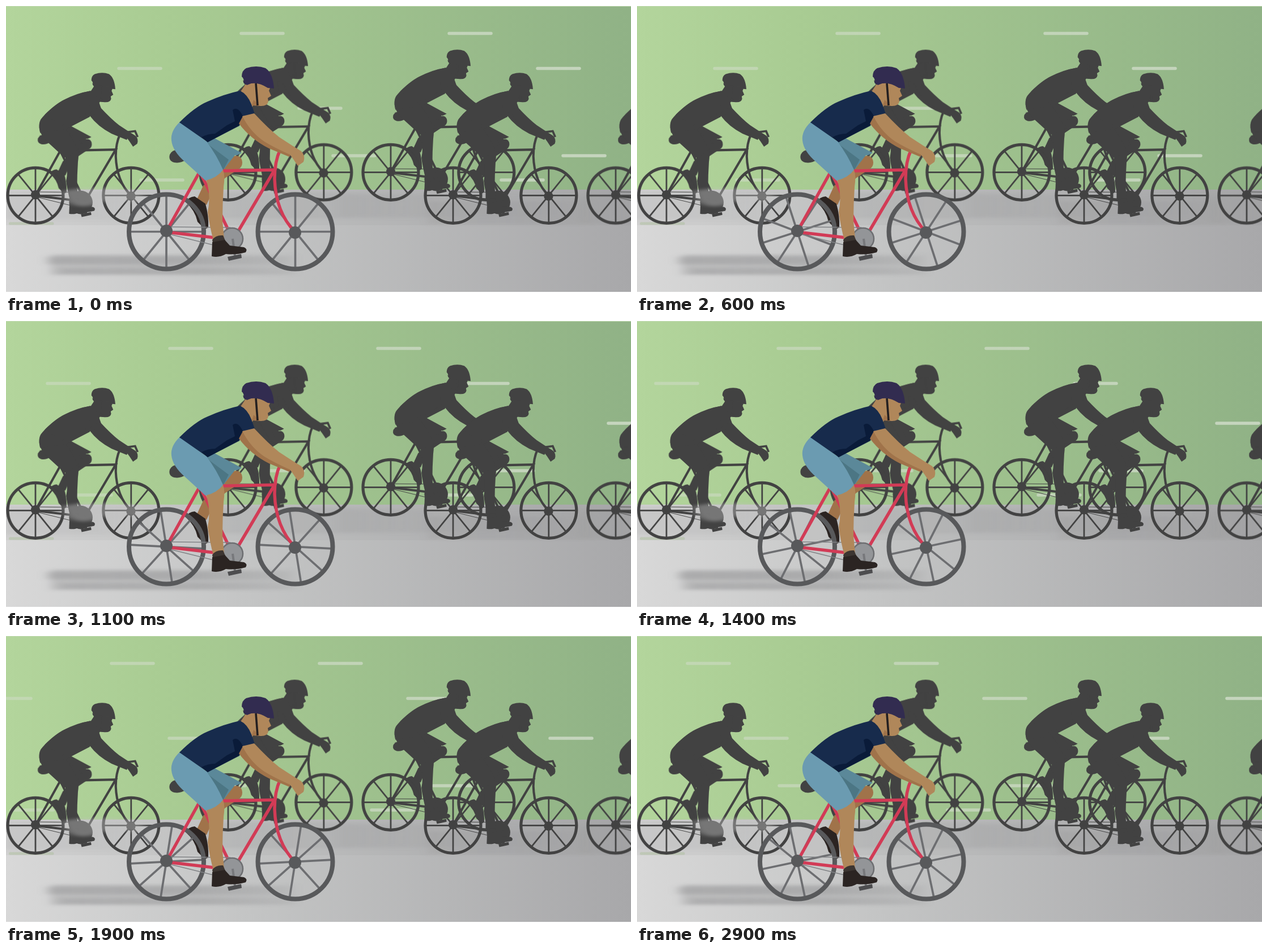
These frames come from a looping animation (1103 px wide and 508 px high, 3000 ms). An HTML page:

```html
<!DOCTYPE html>
<html lang="en">
<head>
<meta charset="utf-8">
<title>Cyclists</title>
<style>
html, body { margin: 0; width: 100%; height: 100%; overflow: hidden; background: #fff; }
svg { display: block; width: 1103px; height: 508px; }
</style>
</head>
<body>
<svg id="stage" viewBox="0 0 1103 508" fill="none">
  <defs>
    <linearGradient id="grass"><stop stop-color="#b3d59c"/><stop offset=".25" stop-color="#a9cc93"/><stop offset="1" stop-color="#90b286"/></linearGradient>
    <linearGradient id="road"><stop stop-color="#d8d8d8"/><stop offset=".4" stop-color="#c3c4c4"/><stop offset="1" stop-color="#a8a8aa"/></linearGradient>
    <linearGradient id="fade"><stop stop-color="#8c8c8e" stop-opacity=".75"/><stop offset=".6" stop-color="#8c8c8e" stop-opacity=".65"/><stop offset="1" stop-color="#8c8c8e" stop-opacity=".2"/></linearGradient>
    <linearGradient id="dash" gradientUnits="userSpaceOnUse" x1="0" y1="0" x2="1103" y2="0">
      <stop stop-color="#d5dccf" stop-opacity=".45"/><stop offset="1" stop-color="#dbe3d5" stop-opacity=".72"/>
    </linearGradient>
    <filter id="soft" x="-20%" y="-60%" width="140%" height="220%"><feGaussianBlur stdDeviation="8 2.5"/></filter>
  </defs>
  <rect width="1103" height="325" fill="url(#grass)"/>
  <path d="M0 .5H1103" stroke="#c3dcb3"/>
  <rect y="325" width="1103" height="181" fill="url(#road)"/>
  <rect y="325" width="1103" height="63" fill="#8c8c8e" opacity=".1"/>
  <path id="dashes" stroke="url(#dash)" stroke-width="5.5" stroke-linecap="round"/>
  <path d="M7.500 385H82" stroke="#a9bd98" stroke-opacity=".45" stroke-width="5" stroke-linecap="round"/>
  <g id="shadows" filter="url(#soft)"></g>
  <g id="pack"></g>
  <path d="M98 328Q150 316 245 328L240 350Q190 338 160 350Q130 362 106 345Z" fill="#c4c4c4" opacity=".4" filter="url(#soft)"/>
  <g id="leader"></g>
</svg>
<script>
const $ = id => document.getElementById(id);
const DARK = "#424242";

// [x, y, width, height, opacity]
$("shadows").innerHTML = [
  [-10, 328, 270, 50, .14], [350, 330, 410, 46, .22], [590, 335, 420, 38, .14], [745, 346, 290, 40, .25],
  [1010, 336, 110, 48, .18], [80, 440, 430, 36, .45], [72, 444, 430, 13, .45], [95, 464, 410, 11, .35]
].map(([x, y, w, h, o]) =>
  `<rect x="${x}" y="${y}" width="${w}" height="${h}" fill="url(#fade)" opacity="${o}"/>`).join("");

function rider(flat) {
  const ink = c => flat ? DARK : c;
  const fill = (c, d) => `<path d="${d}" fill="${ink(c)}"/>`;
  const line = (c, w, d) => `<path d="${d}" stroke="${ink(c)}" stroke-width="${w}"/>`;
  const wheel = (x, y) => {
    const spokes = [0, 51, 90, 129].map(a => `<path d="M-65 0H65" transform="rotate(${a})"/>`).join("");
    return `<g transform="translate(${x} ${y})">
      <g class="spokes" stroke="${ink("#6d6e71")}" stroke-width="3.700">${spokes}</g>
      <circle r="66" stroke="${ink("#58595b")}" stroke-width="${flat ? 7 : 8}"/></g>`;
  };
  const hub = (x, y) => `<circle cx="${x}" cy="${y}" r="11" fill="${ink("#58595b")}"/>`;
  const red = "#d23b56", skin = "#b0875a", shade = "#a0734a", shoe = "#2b2422";
  return [
    // far leg
    fill(DARK, "M289 263Q294 252 312 255L318 272Q308 279 297 277Q286 274 289 263Z"),
    fill(shade, "M378 296L400 266Q416 262 417 277Q417 285 410 289L386 305L362 334L354 352L336 344L348 318Z"),
    fill(shoe, "M317 347Q322 338 333 337L352 350Q358 372 357 392L351 395L338 382Q334 362 317 347Z"),
    fill("#5b8899", "M350 240L366 233L416 260Q408 265 404 264L383 291Z"),
    fill("#4c7684", "M354 243L393 272L383 291Z"),
    // bike
    wheel(283, 399.500), wheel(510.500, 399.500),
    line(red, 5.5, "M283 399L342 293L398 408M376 292L474 290L409 400M283 400L368 410"),
    line(red, 5.5, "M484 254Q474 275 474 306Q476 365 510 400"),
    line("#808285", 1.3, "M285 391L396 392M285 403L386 428"),
    flat ? line(DARK, 5, "M483 255L496 249L520 246L526 260") : "",
    hub(283, 398), hub(510, 401),
    flat ? `<circle cx="391" cy="416" r="28" fill="${DARK}"/>`
         : `<circle cx="399" cy="412" r="19" fill="#939598" stroke="#6d6e71" stroke-width="2.500"/>`,
    line("#77787b", 4, "M400 412L404 442"),
    fill("#4d4d4f", "M391 444L415 439L416 446L393 451Z"),
    // near leg
    fill(skin, "M353 306L383 290Q387 300 384 320Q382 350 382 380L385 412L366 415Q359 388 356 365Q361 340 356 318Z"),
    fill("#3c3531", "M364 414Q370 405 383 406L389 420L366 424Z"),
    fill(shoe, "M364 418Q376 416 386 414L395 424L420 427Q427 430 423 436Q406 441 388 439Q376 446 363 443Z"),
    fill("#6b9bb1", "M307 205Q290 221 292 238Q294 257 316 276L352 309Q373 304 383 290Q372 264 354 240Z"),
    // head
    fill("#2d2631", "M418 132L434 134L432 142L422 140Z"),
    fill(skin, "M413 153L423 138L441 134L466 145L464 150L468 159L462 163L463 169Q461 178 448 177L437 175L430 185Z"),
    fill(shade, "M437 166L448 177L434 176Z"),
    fill("#322c50", "M419 136Q421 129 416 125Q416 114 424 110Q442 104 458 110Q471 119 473 146L462 145Q447 135 433 137L425 140Z"),
    line("#231f20", 3.6, "M441 137L444 176"),
    // torso and arm
    flat ? fill(DARK, "M294 250Q288 224 299 214Q316 193 348 173Q380 155 415 150L356 241Z") : "",
    fill("#172b4c", "M306 206Q334 178 356 169Q385 156 413 150Q426 156 433 174L439 191L418 196L412 212L356 241Z"),
    fill("#0a1b39", "M400 184Q407 178 414 188L419 196L410 212L356 241L345 232Q356 226 369 226L390 211L404 204Z"),
    fill(shade, "M411 208L418 195Q437 222 472 239L505 258L500 267L464 252Q432 236 411 208Z"),
    fill(skin, "M417 195L438 190Q462 216 482 232L505 247L521 257Q529 265 525 276L515 283L507 271L501 263Q472 250 456 240Q432 224 417 195Z")
  ].join("");
}

const packPlaces = [[340, -41], [627, -41], [0, 0], [737, 0], [1024, 0]];
const silhouette = rider(true);
$("pack").innerHTML = packPlaces.map(([x, y]) =>
  `<g transform="translate(${52 + x} ${335 + y}) scale(.742) translate(-283 -399)">${silhouette}</g>`).join("");
$("leader").innerHTML = rider(false);
const spokes = $("leader").querySelectorAll(".spokes");

// [y, starting left edges]
const rows = [
  [48.5, [412, 779]], [110.5, [196, 935, 1364]], [181, [514, 1186]],
  [265, [574, 980]], [308, [235, 871]]
];
// [step, distance scrolled]
const scroll = [[0, 0], [6, 62], [8, 86], [14, 166], [19, 229], [24, 271], [29, 326]];

function scrolled(step) {
  const i = Math.max(1, scroll.findIndex(([s]) => s >= step));
  const [s0, d0] = scroll[i - 1], [s1, d1] = scroll[i];
  return d0 + (d1 - d0) * (step - s0) / (s1 - s0);
}

function draw() {
  const step = Math.floor(performance.now() % 3000 / 100);
  const shift = scrolled(step);
  $("dashes").setAttribute("d", rows.map(([y, xs]) =>
    xs.map(x => `M${x + 3 - shift} ${y}h74`).join("")).join(""));
  spokes.forEach(s => s.setAttribute("transform", `rotate(${step * 12})`));
  requestAnimationFrame(draw);
}
draw();
</script>
</body>
</html>
```
